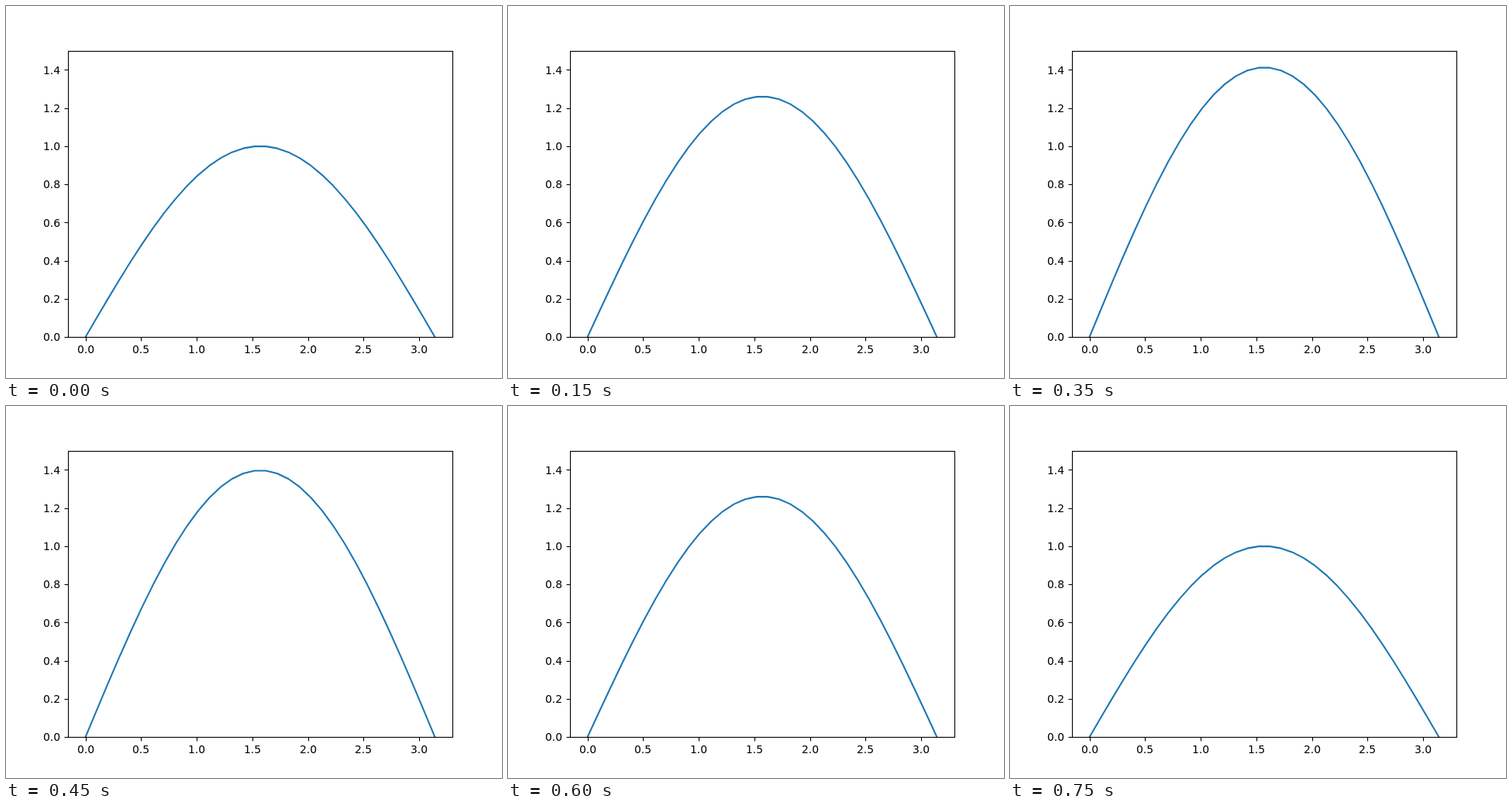
An HTML page with a canvas that plays this animation: 640 px wide and 480 px high, repeating every 800 ms.

```html
<!DOCTYPE html>
<html lang="en">
<head>
<meta charset="utf-8">
<title>Sine arch</title>
<style>
  html, body { margin: 0; height: 100%; overflow: hidden; background: #fff; }
  canvas { display: block; }
</style>
</head>
<body>
<canvas id="plot" width="640" height="480"></canvas>
<script>
const ctx = document.getElementById("plot").getContext("2d");
const POINT = 100 / 72; // pixels per typographic point
const LEFT = 80, RIGHT = 576, TOP = 58, BOTTOM = 427;
const STEP_MS = 50, STEPS = 16, SAMPLES = 32;

const toX = x => 102.545 + x * 450.909 / Math.PI;
const toY = y => 427.2 - y * 246.4;

function line(x1, y1, x2, y2) {
  ctx.beginPath();
  ctx.moveTo(x1 + 0.5, y1 + 0.5);
  ctx.lineTo(x2 + 0.5, y2 + 0.5);
  ctx.stroke();
}

function drawCurve(amplitude) {
  ctx.save();
  ctx.beginPath();
  ctx.rect(LEFT, TOP, RIGHT - LEFT, BOTTOM - TOP);
  ctx.clip();
  ctx.strokeStyle = "#1f77b4";
  ctx.lineWidth = 1.5 * POINT;
  ctx.lineJoin = "round";
  ctx.lineCap = "square";
  ctx.beginPath();
  for (let i = 0; i < SAMPLES; i++) {
    const x = Math.PI * i / (SAMPLES - 1);
    ctx.lineTo(toX(x), toY(amplitude * Math.sin(x)));
  }
  ctx.stroke();
  ctx.restore();
}

function drawAxes() {
  ctx.strokeStyle = ctx.fillStyle = "#000";
  ctx.lineWidth = 0.8 * POINT;
  ctx.font = `${10 * POINT}px "DejaVu Sans", sans-serif`;
  ctx.strokeRect(LEFT + 0.5, TOP + 0.5, RIGHT - LEFT, BOTTOM - TOP);

  for (let i = 0; i <= 6; i++) {
    const x = toX(i * 0.5), tick = Math.round(x);
    line(tick, BOTTOM, tick, BOTTOM + 5);
    ctx.fillText((i * 0.5).toFixed(1), Math.round(x - 11.04), 448);
  }
  for (let i = 0; i <= 7; i++) {
    const y = toY(i * 0.2), tick = Math.round(y);
    line(LEFT, tick, LEFT - 5, tick);
    ctx.fillText((i * 0.2).toFixed(1), 48, Math.round(y + 5.28));
  }
}

function draw(now) {
  const step = Math.floor(now / STEP_MS) % STEPS;
  const phase = step / (STEPS - 1) * Math.PI / 2;
  ctx.fillStyle = "#fff";
  ctx.fillRect(0, 0, 640, 480);
  drawCurve(Math.cos(phase) + Math.sin(phase));
  drawAxes();
}

function loop() {
  draw(performance.now());
  requestAnimationFrame(loop);
}
loop();
</script>
</body>
</html>
```
